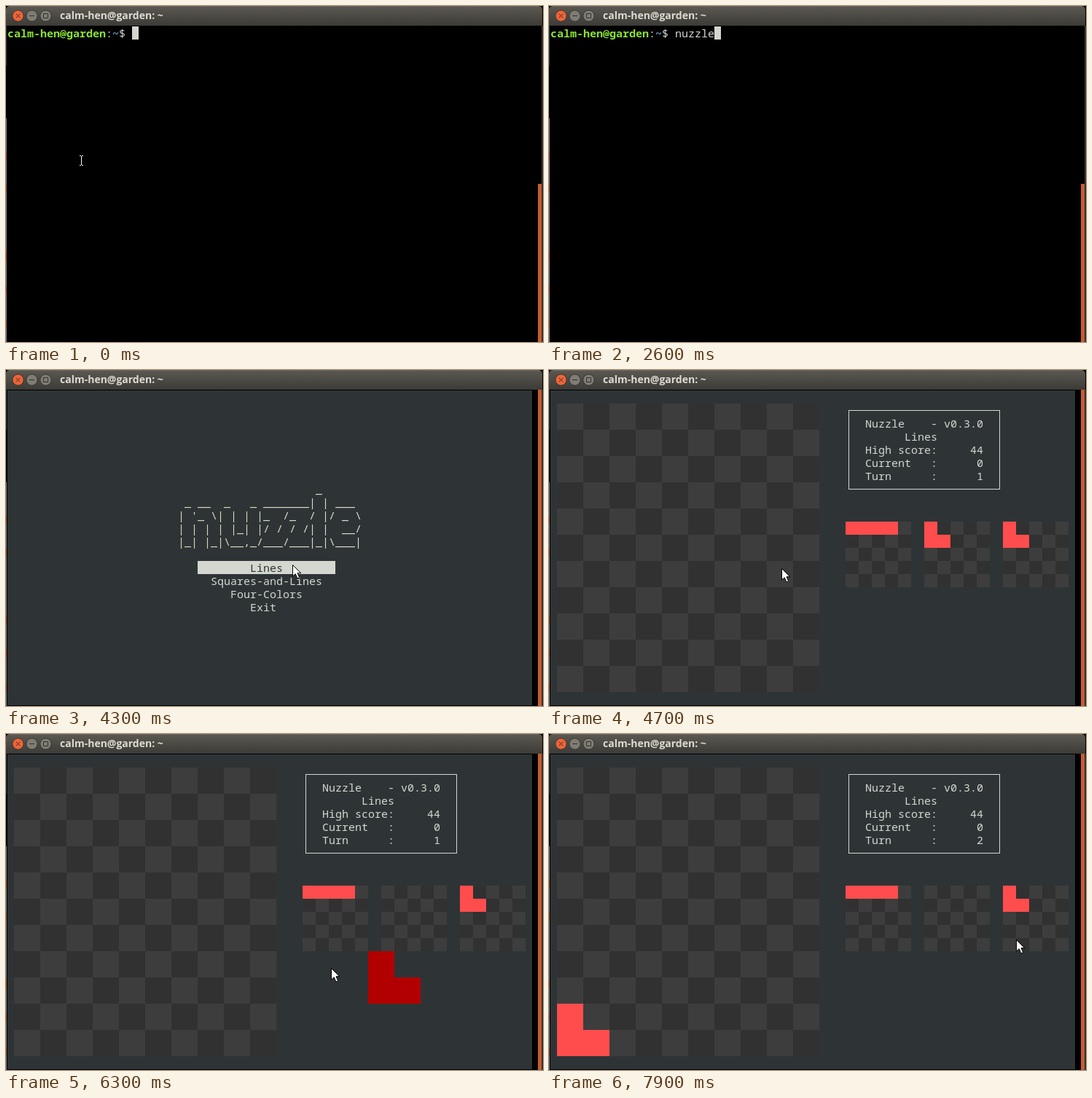
An HTML page with a canvas for the animation above (8 s loop, 737 by 461 pixels).

```html
<!DOCTYPE html>
<html lang="en">
<head>
<meta charset="utf-8">
<title>Terminal puzzle</title>
<style>
  html, body { margin: 0; overflow: hidden; background: #000; }
  canvas { display: block; }
</style>
</head>
<body>
<canvas id="stage" width="737" height="461"></canvas>
<script>
const ctx = document.getElementById('stage').getContext('2d');
const LOOP = 8000, CW = 9, RH = 18, LEFT = 2, TOP = 28;
const FG = '#d3d7cf', BG = '#2e3436', RED = '#ff4d4d', DARK_RED = '#b20000';
const USER = 'calm-hen@garden';
const LOGO = [
  '                     _      ',
  ' _ __  _   _ _______| | ___ ',
  "| '_ \\| | | |_  /_  / |/ _ \\",
  '| | | | |_| |/ / / /| |  __/',
  '|_| |_|\\__,_/___/___|_|\\___|'
];
const BAR = [[0, 0], [1, 0], [2, 0], [3, 0]];
const ELL = [[0, 0], [0, 1], [1, 1]];
const KEY_TIMES = [800, 1100, 1600, 1700, 2400, 2600];
const MENU_AT = 2800, POINTER_AT = 3900, GAME_AT = 4700, PICK_AT = 6000, DROP_AT = 7500;

// Mouse path: time, x, y
const PATH = [
  [3900, 151, 224], [4200, 467, 262], [4400, 319, 272], [5000, 319, 272],
  [5500, 430, 291], [5900, 541, 262], [6000, 552, 264], [6200, 554, 280],
  [6300, 446, 321], [6600, 56, 396], [6700, 46, 392], [6800, 28, 380],
  [7200, 11, 378], [7400, 11, 378], [7900, 641, 282]
];

function mouseAt(t) {
  const i = PATH.findIndex(p => p[0] >= t);
  if (i < 0) return PATH[PATH.length - 1].slice(1);
  if (i === 0) return PATH[0].slice(1);
  const [t0, x0, y0] = PATH[i - 1], [t1, x1, y1] = PATH[i];
  const k = (t - t0) / (t1 - t0);
  return [Math.round(x0 + (x1 - x0) * k), Math.round(y0 + (y1 - y0) * k)];
}

function rect(color, x, y, w, h) {
  ctx.fillStyle = color;
  ctx.fillRect(x, y, w, h);
}

function print(col, row, text, color = FG, weight = 'normal') {
  ctx.font = `${weight} 15px "Noto Sans Mono", "DejaVu Sans Mono", monospace`;
  ctx.fillStyle = color;
  ctx.fillText(text, LEFT + col * CW, TOP + row * RH + 15);
}

function checker(x, y, cols, rows, size) {
  for (let r = 0; r < rows; r++)
    for (let c = 0; c < cols; c++)
      rect((r + c) % 2 ? '#313131' : '#3d3d3d', x + c * size, y + r * size, size, size);
}

function piece(shape, color, x, y, size) {
  for (const [c, r] of shape) rect(color, x + c * size, y + r * size, size, size);
}

function titleButton(x, color, glyph) {
  ctx.beginPath();
  ctx.arc(x, 13.5, 7.7, 0, 7);
  ctx.fillStyle = color;
  ctx.fill();
  ctx.lineWidth = 1;
  ctx.strokeStyle = '#33312d';
  ctx.stroke();
  ctx.stroke(new Path2D(glyph));
}

function windowFrame() {
  const shade = ctx.createLinearGradient(0, 0, 0, 27);
  shade.addColorStop(0, '#5b5951');
  shade.addColorStop(1, '#3c3b37');
  rect('#000', 0, 0, 737, 461);
  ctx.fillStyle = shade;
  ctx.beginPath();
  ctx.roundRect(0, 0, 736, 27, [5, 5, 0, 0]);
  ctx.fill();
  rect('#6a6860', 5, 0, 726, 1);

  titleButton(16.5, '#ee6438', 'M13.7 10.7l5.6 5.6m0-5.6l-5.6 5.6');
  titleButton(35.5, '#7f7c74', 'M32 13.5h7');
  titleButton(54.5, '#7f7c74', 'M51.5 10.5h6v6h-6z');
  ctx.font = 'bold 14px "Open Sans", "Noto Sans", sans-serif';
  ctx.fillStyle = '#dfdbd2';
  ctx.fillText(USER + ': ~', 74, 18);

  // Slivers of the desktop beside the window
  rect('#2b3445', 0, 27, 1, 55);
  rect('#77757a', 0, 154, 1, 307);
  for (const y of [200, 246, 338, 384, 430]) rect('#a8502c', 0, y, 1, 10);
  rect('#34332f', 735, 27, 2, 434);
}

function shell(t) {
  const typed = KEY_TIMES.filter(k => t >= k).length;
  print(0, 0, USER, '#8ae234', 'bold');
  print(15, 0, ':');
  print(16, 0, '~', '#729fcf', 'bold');
  print(17, 0, '$ ' + 'nuzzle'.slice(0, typed));
  if (t < 100 || t >= 700) rect(FG, LEFT + (19 + typed) * CW, TOP, CW, RH);
  if (!typed) {
    ctx.lineWidth = 1;
    ctx.strokeStyle = '#fff';
    ctx.stroke(new Path2D('M101 205.5h2m1 0h2M103.5 206v12M101 218.5h2m1 0h2'));
  }
}

function menu() {
  const tint = ctx.createLinearGradient(236, 154, 488, 244);
  tint.addColorStop(0, '#d8d8b0');
  tint.addColorStop(1, '#deded4');
  LOGO.forEach((line, i) => print(26, 7 + i, line, tint));
  rect(FG, LEFT + 29 * CW, TOP + 13 * RH, 21 * CW, RH);
  print(37, 13, 'Lines', BG);
  print(31, 14, 'Squares-and-Lines');
  print(34, 15, 'Four-Colors');
  print(37, 16, 'Exit');
}

function game(t) {
  checker(11, 46, 10, 11, 36);
  ctx.lineWidth = 1;
  ctx.strokeStyle = FG;
  ctx.strokeRect(411.5, 55.5, 207, 108);
  print(48, 2, 'Nuzzle    - v0.3.0');
  print(54, 3, 'Lines');
  const score = (row, label, value) =>
    print(48, row, label.padEnd(10) + ':' + String(value).padStart(7));
  score(4, 'High score', 44);
  score(5, 'Current', 0);
  score(6, 'Turn', t < DROP_AT ? 1 : 2);

  [BAR, t < PICK_AT ? ELL : [], ELL].forEach((shape, i) => {
    checker(407 + i * 108, 208, 5, 5, 18);
    piece(shape, RED, 407 + i * 108, 208, 18);
  });

  if (t >= DROP_AT) piece(ELL, RED, 11, 370, 36);
  else if (t >= PICK_AT) {
    // The dragged piece trails the mouse and snaps to text cells
    const [x, y] = mouseAt(t - 50);
    const snap = (v, origin, step) => origin + Math.floor((v - origin) / step) * step;
    piece(ELL, DARK_RED, snap(x, LEFT, CW), snap(y, TOP, RH), 36);
  }
}

function arrow([x, y]) {
  ctx.save();
  ctx.translate(x + 0.5, y + 0.5);
  const shape = new Path2D('M0 0V15.5L3.7 12.2 6.4 18.4 9.2 17.2 6.5 11.2H11.3Z');
  ctx.fillStyle = '#fff';
  ctx.fill(shape);
  ctx.lineWidth = 1;
  ctx.strokeStyle = '#000';
  ctx.stroke(shape);
  ctx.restore();
}

function draw(now) {
  const t = Math.floor((now % LOOP) / 100) * 100;
  windowFrame();
  const barTop = t < MENU_AT ? 244 : 27;
  rect('#c75c30', 730, barTop, 5, 461 - barTop);
  if (t < MENU_AT) shell(t);
  else {
    rect(BG, LEFT, TOP, 80 * CW, 24 * RH);
    if (t < GAME_AT) menu();
    else game(t);
    if (t >= POINTER_AT) arrow(mouseAt(t));
  }
}

const start = performance.now();
function tick() {
  draw(performance.now() - start);
  requestAnimationFrame(tick);
}
tick();
</script>
</body>
</html>
```
